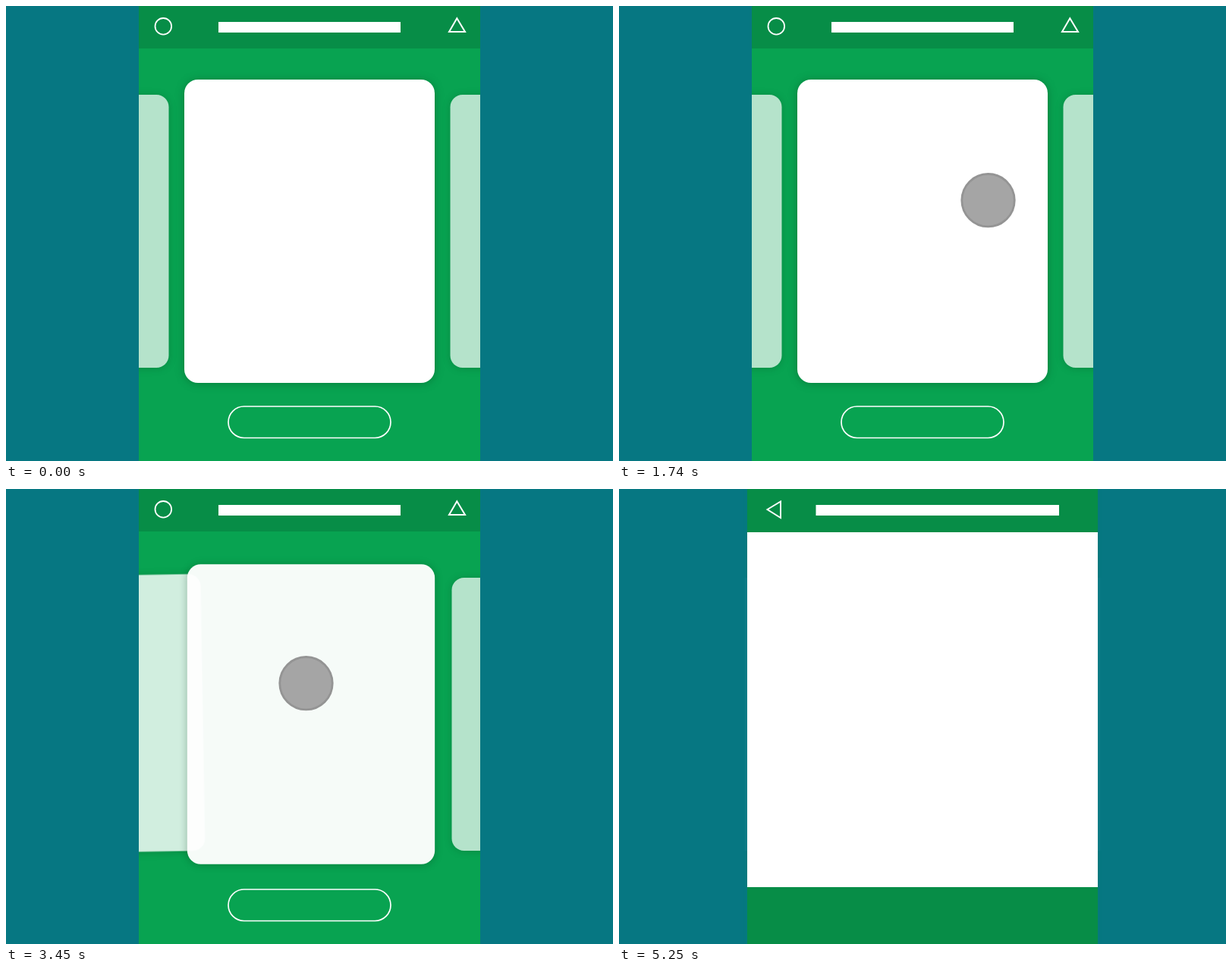
Recreate the animation shown at these times as an HTML page. Size 800 by 600 pixels, loop 6030 ms.

```html
<!DOCTYPE html>
<html lang="en">
<head>
<meta charset="utf-8">
<title>Card swipe</title>
<style>
  html, body { margin: 0; width: 100%; height: 100%; overflow: hidden; background: #067782; }
  svg { display: block; width: 100vw; height: 100vh; }
  .card { fill: #fff; filter: drop-shadow(0 1px 6px rgba(0, 50, 20, .32)); }
  .line { fill: none; stroke: #fff; stroke-width: 2; }
</style>
</head>
<body>
<svg viewBox="0 0 800 600">
  <defs>
    <clipPath id="phone"><rect x="175" width="450" height="600"/></clipPath>
    <clipPath id="page"><rect x="169" width="462" height="600"/></clipPath>
    <filter id="smear" filterUnits="userSpaceOnUse" x="120" y="0" width="560" height="600" color-interpolation-filters="sRGB">
      <feGaussianBlur id="smearBlur" stdDeviation="0 0"/>
    </filter>
  </defs>
  <rect width="800" height="600" fill="#067782"/>

  <g id="home">
    <g clip-path="url(#phone)">
      <rect x="175" width="450" height="600" fill="#08a351"/>
      <rect x="175" width="450" height="56" fill="#078d47"/>
      <circle class="line" cx="207.3" cy="26.8" r="10.8" style="stroke-width:1.8"/>
      <rect x="280" y="21" width="240" height="14" fill="#fff"/>
      <path class="line" d="M594.3 16.3 L584 34 H605 Z"/>
      <rect class="line" x="293" y="528" width="214" height="41.5" rx="20.7" style="stroke-width:1.7"/>
      <g id="cards"></g>
      <circle id="touch" cy="256.2" r="34.7" fill="#a5a5a5" stroke="#949494" stroke-width="2.8"/>
    </g>
  </g>

  <g id="detail" clip-path="url(#page)">
    <rect id="hero" class="card"/>
    <g id="top">
      <rect x="169" width="462" height="57" fill="#078d47"/>
      <path class="line" d="M195.5 27 L213 16.5 V38 Z"/>
      <rect x="259.5" y="21" width="320.5" height="14" fill="#fff"/>
    </g>
    <rect id="bottom" x="169" y="525" width="462" height="75" fill="#078d47"/>
  </g>
</svg>

<script>
const LOOP = 6030, SWIPES = [840, 2030, 3210], SWIPE_TIME = 600;
const MID = 400, MID_Y = 297, GAP = 334;
const TOUCH_FROM = 553, TOUCH_TO = 395.5;
const OPEN = 4020, GROW = 4430, BARS = 4870;

const $ = id => document.getElementById(id);
const mix = (a, b, k) => a + (b - a) * k;
const span = (t, start, length) => Math.min(1, Math.max(0, (t - start) / length));
const easeOut = (u, power) => 1 - (1 - u) ** power;
const easeInOut = u => u < .5 ? 4 * u ** 3 : 1 - 4 * (1 - u) ** 3;

function set(node, attrs) {
  for (const name in attrs) node.setAttribute(name, attrs[name]);
}

// Paint order: leaving, outgoing, next, incoming
const [leaving, outgoing, next, incoming] = Array.from({ length: 4 }, () => {
  const card = document.createElementNS('http://www.w3.org/2000/svg', 'rect');
  set(card, { class: 'card', x: -165, y: -200, width: 330, height: 400, rx: 18 });
  return $('cards').appendChild(card);
});

function place(card, x, scale, opacity, angle = 0) {
  set(card, { transform: `translate(${x} ${MID_Y}) rotate(${angle}) scale(${scale})`, opacity });
}

function drawCards(t) {
  const start = SWIPES.filter(s => s <= t).pop() ?? SWIPES[0];
  const u = span(t, start, SWIPE_TIME);
  const v = span(t, start + 50, SWIPE_TIME - 50);
  const out = easeOut(u, 4);
  const slide = easeOut(v, 12);
  const grow = 1 - .8 * (1 - v) ** 8 - .2 * (1 - v) ** 2;
  const fade = span(out, .67, .33);
  const tilt = u > 0 && u < 1 ? -10 * Math.exp(-(((u - .15) / (u < .15 ? .07 : .165)) ** 2)) : 0;
  const cleared = 1 - span(t, GROW, 320);

  place(leaving, MID - GAP * (1 + out), .9, .7);
  place(outgoing, MID - GAP * out, 1 - .1 * out, 1 - .3 * fade, tilt);
  place(next, MID + GAP * (2 - slide), .9, .7);
  place(incoming, MID + GAP * (1 - slide), .9 + .1 * grow, (.7 + .3 * grow) * cleared);
}

function touchX(t) {
  let x = TOUCH_FROM;
  SWIPES.forEach((start, i) => {
    if (t < start) return;
    x = mix(TOUCH_FROM, TOUCH_TO, easeOut(span(t, start, 150), 3));
    if (i < SWIPES.length - 1) x = mix(x, TOUCH_FROM, easeInOut(span(t, start + 690, 400)));
  });
  return x;
}

function drawDetail(t) {
  const blur = 5 * easeInOut(span(t, OPEN, 600));
  $('smearBlur').setAttribute('stdDeviation', `${blur} 0`);
  $('home').style.filter = blur > .01 ? 'url(#smear)' : 'none';

  const u = span(t, GROW, 690), k = easeInOut(u);
  const w = mix(330, 462, k), h = mix(400, 550, k);
  set($('hero'), {
    x: MID - w / 2, y: MID_Y + k - h / 2, width: w, height: h,
    rx: 18 * w / 330, opacity: easeOut(u, 2)
  });

  const away = 1 - easeOut(span(t, BARS, 380), 3);
  $('top').setAttribute('transform', `translate(0 ${-58 * away})`);
  $('bottom').setAttribute('transform', `translate(0 ${76 * away})`);
  $('detail').style.display = t >= GROW ? 'inline' : 'none';
}

function draw(t) {
  drawCards(t);
  set($('touch'), { cx: touchX(t), opacity: span(t, 30, 420) });
  drawDetail(t);
}

const origin = performance.now();
function tick() {
  draw((performance.now() - origin) % LOOP);
  requestAnimationFrame(tick);
}
tick();
</script>
</body>
</html>
```
